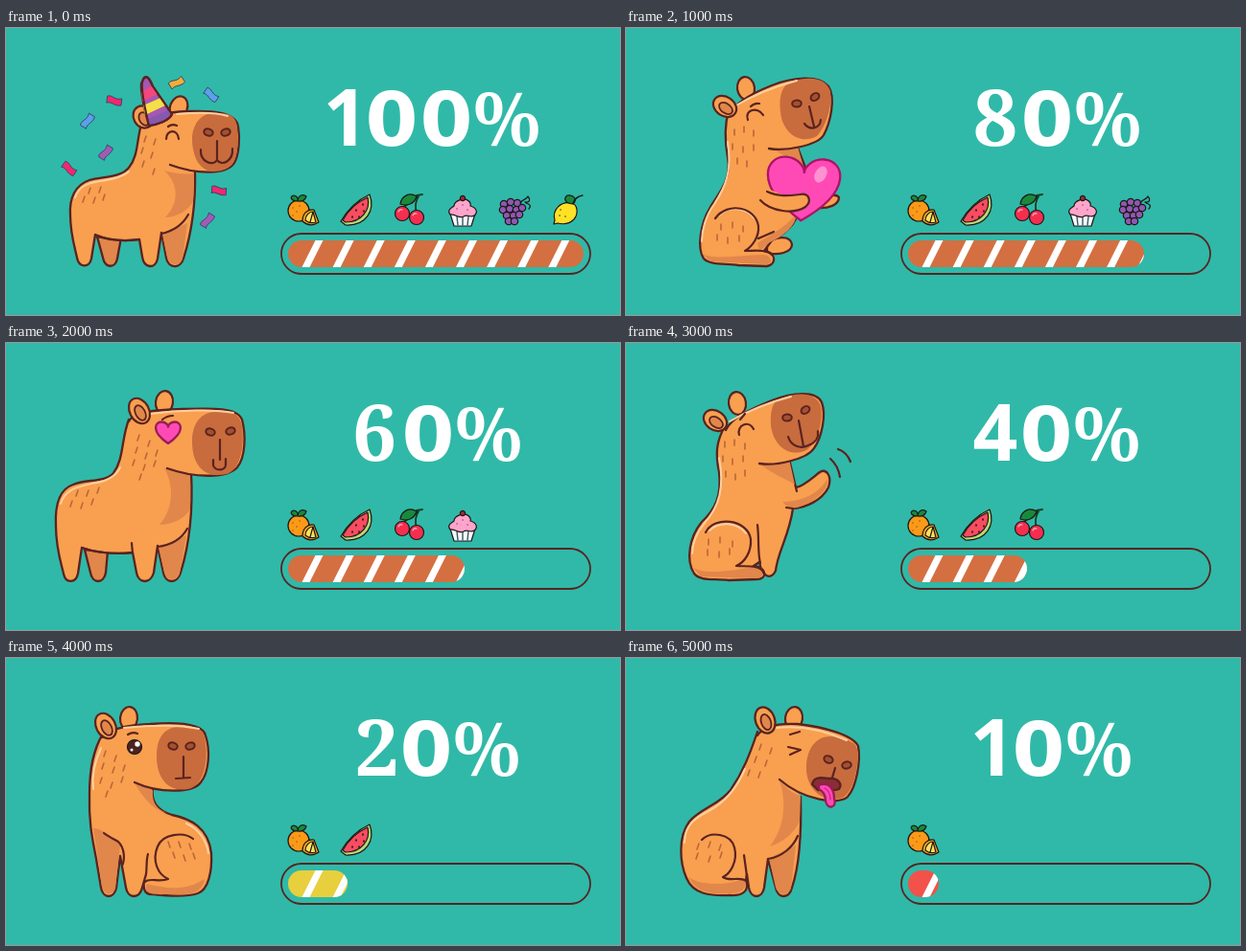
These frames come from a looping animation (640 px wide and 300 px high, 6 s). An HTML page:

```html
<!DOCTYPE html>
<html lang="en">
<head>
<meta charset="utf-8">
<title>Capybara countdown</title>
<style>
  html, body { margin: 0; width: 100%; height: 100%; overflow: hidden; background: #30b9a8; }
  svg { display: block; width: 100%; height: 100%; }
  path, ellipse { stroke-linecap: round; stroke-linejoin: round; }
</style>
</head>
<body>
<svg id="stage" viewBox="0 0 640 300"></svg>
<script>
const INK = '#5a2320', FUR = '#f99f50', SHADE = '#e1874b', SNOUT = '#c86c3e',
      LIGHT = '#ffd0a0', PINK = '#ff4ab6';

const path = (d, fill = 'none', stroke = INK, width = 2.3) =>
  `<path d="${d}" fill="${fill}" stroke="${stroke}" stroke-width="${width}" vector-effect="non-scaling-stroke"/>`;
const fur = d => path(d, FUR);
const dark = d => path(d, SHADE);
const shade = d => path(d, SHADE, 'none');
const light = d => path(d, 'none', LIGHT, 2);
const line = (d, width = 2.2) => path(d, 'none', INK, width);
const oval = (x, y, rx, ry, turn = 0, fill = FUR, stroke = INK, width = 2.2) =>
  `<ellipse transform="translate(${x} ${y}) rotate(${turn})" rx="${rx}" ry="${ry}" fill="${fill}" stroke="${stroke}" stroke-width="${width}"/>`;
const ball = (x, y, r, fill) => oval(x, y, r, r, 0, fill, '#1d1716', 1.2);
const farEar = (x, y, turn) => oval(x, y, 9, 12, turn);
const nearEar = (x, y, turn, ry = 12) =>
  oval(x, y, 10, ry, turn) + oval(x + 1, y + 2, 5, ry * .6, turn, SHADE, INK, 1.8);
const nostrils = (x1, y1, x2, y2, turn = 0) =>
  oval(x1, y1, 4.8, 3.6, turn + 18, '#a5502f', INK, 2) +
  oval(x2, y2, 4.8, 3.6, turn - 18, '#a5502f', INK, 2);
const snout = d => path(d, SNOUT, 'none');
const hairs = (points, dx = -2) =>
  path(points.trim().split(' ').map(p => `M${p}l${dx} 6`).join(''), 'none', '#ba6638', 1.6);
const heart = (x, y, scale, turn, stroke) =>
  `<g transform="translate(${x} ${y}) rotate(${turn}) scale(${scale})">` +
  path('M0 9.5C-16-1-12-10-6-10C-2-10 0-7 0-5.5C0-7 2-10 6-10C12-10 16-1 0 9.5Z', PINK, stroke) + '</g>';
const ribbon = (x, y, turn, color) =>
  `<g transform="translate(${x} ${y}) rotate(${turn})">` +
  path('M-8-3C-4-6 0 0 7-4L8 3C2 6-3 1-7 4Z', color, '#3c4668', 1) + '</g>';

function party() {
  const confetti = [
    [85, 97, -50, '#5aa0ea'], [113, 76, 15, '#f5266f'], [178, 57, -25, '#f2ae35'], [214, 70, 42, '#5aa0ea'],
    [104, 130, -50, '#a35ab7'], [66, 147, 42, '#f5266f'], [222, 170, 12, '#f5266f'], [210, 201, -50, '#a35ab7']
  ].map(c => ribbon(...c)).join('');
  return confetti + dark('M95 218L101 240C103 251 114 252 116 241L120 219Z') +
    farEar(180, 83, 20) +
    fur('M141 101C136 118 138 134 128 146C119 157 100 155 87 159C72 164 66 178 67 195C67 216 72 230 74 240C76 251 87 251 89 241L93 216C110 223 125 223 139 221L142 239C144 252 156 252 158 241L162 214L167 240C169 252 182 252 185 241C191 222 198 190 197 150') +
    shade('M165 149C179 153 190 153 196 152L195 181C191 190 178 198 166 198C179 185 182 165 165 149Z') +
    shade('M163 216L189 204L184 241C182 249 170 249 168 240Z') +
    light('M72 177C76 165 86 162 98 160C111 158 121 156 128 150') +
    line('M93 217C110 223 125 223 139 221M162 215C175 212 184 206 190 195') +
    fur('M140 104C147 92 165 88 190 87C216 86 240 88 242 103C244 115 243 132 238 141C230 154 198 153 171 143') +
    snout('M217 89C235 88 241 93 241 107C243 137 238 150 215 150C199 148 194 130 194 115C195 99 204 89 217 89Z') +
    light('M178 90C200 88 219 88 231 92') + nearEar(143, 93, -28) +
    path('M144 52C148 49 151 57 153 61L173 90C170 97 158 101 149 102C145 87 140 70 141 58Z', '#a557b3') +
    path('M141 67L153 60L158 69L142 77Z', '#f5477d', 'none') +
    path('M143 81L161 73L166 81L145 91Z', '#f5df45', 'none') +
    path('M146 96L169 86L172 90C168 96 157 100 149 101Z', '#8758b0', 'none') +
    line('M144 52C140 55 142 73 149 102C158 101 170 97 173 90L153 61C151 55 148 49 144 52Z') +
    line('M167 116C167 106 179 105 180 116M169 103Q173 100 178 102') +
    nostrils(211, 109, 229, 109) +
    line('M220 118V138M203 127C202 140 216 145 220 138C225 145 237 139 236 126') +
    hairs('146,113 156,116 143,125 153,130 144,139 155,147 88,167 99,166 82,176 93,177 103,174');
}

function cuddle() {
  return farEar(125, 63, -8) +
    fur('M147 225C155 218 171 216 173 226C173 235 158 238 147 235Z') +
    fur('M107 86C102 104 103 119 106 135C110 158 98 171 88 187C77 205 74 231 81 241C87 248 105 246 117 248L147 249C157 247 157 235 144 233L152 222C170 213 181 200 181 183L187 146L177 120') +
    shade('M148 124L178 120L184 142L174 139C166 133 157 129 148 124Z') +
    shade('M79 235C89 243 112 238 143 237C153 238 154 247 146 247L88 244Z') +
    shade('M137 225C153 215 167 207 178 194C177 207 165 217 150 224L139 233Z') +
    light('M106 119C111 151 103 167 92 184C83 196 79 212 79 223M97 196C106 186 125 187 134 199') +
    line('M93 199C106 181 135 187 138 207C139 218 132 228 124 233C133 233 146 231 152 237M138 220L154 213') +
    fur('M108 92C111 79 132 68 152 60C172 52 201 48 211 61C219 73 213 99 206 112C199 123 166 129 149 126') +
    snout('M172 56C196 49 209 54 213 66C215 83 208 104 199 113C181 123 163 109 161 88C159 70 163 60 172 56Z') +
    light('M113 82C134 69 156 61 178 55') + nearEar(103, 82, -55, 13) +
    fur('M202 174C211 179 217 171 222 177C222 185 211 189 199 188Z') +
    heart(184.5, 169.5, 3.35, 4, '#ad1269') +
    oval(203, 153, 6, 9, 28, '#ff91d1', 'none') +
    path('M139 159C151 174 168 176 181 174C191 172 194 181 187 187C175 195 151 192 140 183', FUR, 'none') +
    line('M147 171C160 177 172 175 181 174C191 172 194 181 187 187C175 195 151 192 140 180') +
    line('M127 96C123 86 137 81 143 91M130 82Q134 78 139 79') +
    nostrils(178, 79, 197, 72, -20) +
    line('M191 82L196 103M186 100C191 107 202 106 203 96') +
    hairs('113,106 123,103 133,107 111,121 122,124 133,122 116,136 126,139 99,205 111,203 122,207 95,216 106,219 118,217', 0);
}

function smitten() {
  return dark('M82 216L88 240C90 252 102 252 104 240L106 218Z') + farEar(165, 62, 8) +
    fur('M128 80C120 101 123 121 112 136C103 146 83 142 70 148C55 153 51 171 52 191C52 214 57 229 60 241C62 252 73 251 75 241L79 214C97 220 114 221 132 219L136 240C138 252 151 252 154 240L158 212L164 240C166 252 179 252 182 240C191 211 195 174 193 135') +
    shade('M165 131L192 138L192 173C187 184 172 190 160 190C174 174 176 150 165 131Z') +
    shade('M159 214L188 201L181 241C179 249 167 249 165 240Z') +
    light('M57 168C62 151 77 150 94 146C107 144 115 138 119 130') +
    line('M79 214C97 220 114 221 132 219M158 213C174 211 184 203 189 194M131 209L132 220') +
    fur('M128 82C133 72 154 70 184 69C215 68 241 67 246 80C250 95 250 119 241 130C231 141 199 142 168 131') +
    snout('M219 72C237 71 244 75 246 87C249 108 244 133 230 137C203 143 194 123 194 103C194 83 204 72 219 72Z') +
    light('M151 74C180 70 218 69 237 73') + nearEar(139, 71, -28, 14) +
    heart(169, 94, 1.15, 0, '#961e54') + line('M163 80Q168 76 174 76') +
    nostrils(213, 93, 234, 92) +
    line('M223 101V122M216 122V128C218 134 229 134 229 127V121') +
    hairs('139,96 150,102 137,109 147,115 158,112 134,122 145,127 156,123 141,137 75,154 86,154 97,151 69,165 80,167 91,163');
}

function wave() {
  return farEar(116, 63, -8) +
    fur('M103 87C94 103 93 116 97 135C100 159 93 174 79 187C66 203 62 227 71 241C77 249 91 246 107 248L136 247C148 247 147 235 133 233L139 229C142 245 151 248 156 238C158 218 170 202 174 173C187 172 204 165 211 151C215 139 209 131 202 135C194 141 185 150 177 151L170 121') +
    shade('M139 126L170 121L176 148C166 142 153 137 139 126Z') +
    shade('M163 166C184 166 201 157 210 142C212 157 187 173 170 173Z') +
    shade('M69 234C80 243 111 238 133 234C145 236 145 246 135 246L78 244Z') +
    light('M97 120C103 151 97 171 82 188C73 199 69 210 69 220M87 196C97 186 116 187 125 199') +
    line('M83 198C92 180 127 184 130 205C131 218 124 229 115 233C124 234 139 231 144 240M137 190C139 207 137 219 140 230M177 151L178 155M174 173L167 172') +
    fur('M104 91C110 78 132 68 152 60C173 52 198 49 204 62C209 75 204 99 196 110C189 121 157 129 139 126') +
    snout('M161 58C185 49 199 54 203 66C206 81 200 104 188 112C168 121 153 105 151 86C150 70 153 61 161 58Z') +
    light('M108 82C130 69 149 62 172 56') + nearEar(93, 81, -55, 13) +
    line('M118 96C115 86 128 80 133 90M119 80L124 74') +
    nostrils(168, 78, 187, 70, -20) +
    line('M180 81L185 108M169 98C172 108 182 111 190 107C198 104 201 98 200 92') +
    line('M221 111Q230 114 234 124M213 121Q221 128 223 140') +
    hairs('103,103 113,101 124,105 101,118 111,121 122,118 104,134 114,137 124,133 86,205 98,203 111,207 85,216 97,218 108,215', 0);
}

function waiting() {
  return farEar(128, 63, 6) +
    fur('M101 79C91 96 87 115 87 143C86 178 92 196 95 216L99 240C101 252 113 252 115 240L119 207L125 240C127 252 139 252 142 240L146 226C142 238 142 248 154 247C171 249 188 250 200 246C211 242 215 223 214 204C211 177 192 168 173 164C157 159 151 149 153 136') +
    shade('M134 131L153 138C152 150 156 158 168 162C153 159 144 147 134 131Z') +
    shade('M91 178C98 178 108 184 119 195L114 241C111 249 102 248 100 239Z') +
    shade('M147 236C166 241 187 244 207 231C204 247 192 248 167 247C148 248 143 244 147 236Z') +
    light('M91 137C89 122 94 105 99 94M188 173C200 178 209 190 211 204') +
    line('M102 183C107 187 114 190 117 192C124 199 124 211 121 217M146 226C147 219 146 211 148 205M195 189C185 181 163 184 158 197C152 212 158 226 169 231C160 235 149 229 145 234') +
    fur('M100 83C108 73 130 70 150 69C176 67 205 68 208 81C213 96 212 119 203 130C195 141 160 142 134 130') +
    snout('M181 72C201 71 207 75 208 89C211 111 205 134 190 137C166 141 157 122 157 103C157 82 166 72 181 72Z') +
    light('M123 73C152 70 183 70 201 74') + nearEar(104, 71, -28, 14) +
    ball(134, 93, 7.5, '#4c241f') + oval(137, 90, 2.7, 2.7, 0, '#fff', 'none') + oval(131, 96, 1.5, 1.5, 0, '#fff', 'none') +
    line('M127 80Q132 77 137 79') + nostrils(174, 92, 192, 92) +
    line('M185 103V125M177 126L192 125') +
    hairs('104,97 115,102 102,110 113,114 124,112 100,125 111,130 122,124 106,139') +
    hairs('169,192 180,192 191,194 174,203 185,206 195,204', 2);
}

function yuck() {
  return farEar(175, 63, 8) +
    fur('M137 77C129 101 122 119 109 138C98 153 78 157 66 171C54 187 56 214 63 230C70 247 88 249 108 248C122 249 129 243 125 232L126 226L128 240C130 252 142 252 144 240L148 210L156 240C158 252 170 252 173 240C181 216 183 181 182 145') +
    shade('M160 128C169 138 175 142 182 144L181 171C174 184 163 193 150 197C165 177 168 152 160 128Z') +
    shade('M149 209L177 196L172 240C170 249 159 249 156 240Z') +
    shade('M65 229C80 239 106 237 123 231C128 242 118 247 105 246C83 248 71 241 65 229Z') +
    light('M61 193C61 175 72 167 86 160C103 151 116 135 124 116') +
    line('M79 190C88 181 109 183 113 198C117 213 108 226 101 229C108 234 119 228 125 233M123 206L126 228M148 210C162 208 174 198 179 186') +
    fur('M137 81C143 71 159 68 179 69C205 72 236 80 242 92C245 108 240 135 231 145C222 154 185 149 160 127') +
    snout('M214 82C232 85 240 88 241 96C243 113 237 140 226 146C204 153 189 136 188 117C187 97 197 81 214 82Z') +
    light('M157 73C183 70 210 77 230 86') + nearEar(145, 65, -20, 14) +
    line('M169 93L182 96L171 101M171 80L181 77') +
    nostrils(211, 106, 230, 112, 8) + line('M218 115L215 125') +
    path('M194 132C196 122 207 126 212 126C221 125 226 132 222 137C215 140 208 137 200 138Z', '#8b2d35') +
    path('M201 133C211 129 217 136 217 147C221 157 209 159 208 149C208 143 205 139 201 137Z', PINK, '#961e54') +
    path('M207 136Q213 139 213 148', 'none', '#c82483', 1.3) +
    hairs('141,90 152,94 136,103 147,107 129,117 140,119 76,194 88,192 99,195 75,204 88,207 100,203');
}

const BLACK = '#1d1716', LEAF = '#188a3c';
const trim = (d, fill) => path(d, fill, BLACK, 1.2);
const treats = [
  ball(305, 191, 11, '#fb9a18') +
    trim('M304 181C297 181 295 176 300 175Q305 176 304 181C305 173 311 174 313 176Q311 182 304 181Z', LEAF) +
    path('M299 188h.1M303 192h.1M299 196h.1M306 186h.1', 'none', '#a75310', 1.5) +
    trim('M309 202C309 194 314 189 321 190L326 203Q317 209 309 202Z', '#fba41c') +
    trim('M312 201C312 196 316 192 320 192L323 203Q317 205 312 201ZM320 192L317 203', '#ffe15b'),
  trim('M349 202C356 190 366 180 379 174C385 190 376 207 354 206Z', '#b7d976') +
    trim('M351 201C357 190 366 182 377 177C380 190 371 203 354 203Z', '#fa4c61') +
    path('M361 197v1M365 190v1M372 184v1M368 197v1M373 191v1', 'none', BLACK, 1.6),
  path('M414 188C418 184 424 180 430 176Q425 184 428 193M428 175L434 174', 'none', '#183e25', 1.8) +
    trim('M428 176C420 171 412 176 411 184C419 187 426 183 428 176Z', LEAF) +
    ball(413, 194, 7.5, '#f52e50') + ball(428, 198, 7.5, '#f52e50') +
    path('M409 192q1-3 4-2M424 196q1-3 4-2', 'none', '#ffabbb', 1.3),
  trim('M463 194L467 207H485L489 194Z', '#f5fbff') + path('M470 197L471 206M476 197V206M482 197L481 206', 'none', '#3d5560', 1.4) +
    trim('M463 195C459 190 465 188 467 186C467 181 472 180 475 179C482 178 485 183 484 186C491 188 492 193 488 196C484 199 481 194 477 197C472 200 469 194 463 195Z', '#ffa4cb') +
    ball(476, 178, 2.6, '#a02a38') + path('M470 189h.1M476 185h.1M481 190h.1', 'none', '#95407f', 1.5),
  [[519, 184], [526, 182], [533, 183], [518, 190], [525, 189], [532, 190], [538, 188], [522, 196], [529, 196], [535, 195], [524, 202], [530, 202]]
    .map(([x, y]) => ball(x, y, 3.7, '#8f58b2')).join('') +
    path('M536 183C539 178 542 180 544 176C547 179 546 183 541 182M542 183Q549 185 545 189', 'none', BLACK, 1.3),
  trim('M572 201C569 190 578 181 589 183C596 184 597 194 592 200C586 206 579 205 575 204L571 205Z', '#ffe126') +
    trim('M591 184C582 183 581 178 585 175C592 174 596 179 591 184Z', LEAF) +
    path('M591 183Q594 176 601 175M578 190h.1M577 196h.1M583 197h.1', 'none', BLACK, 1.3)
];

const scenes = [
  { pose: party, label: '100%', centers: [354, 402, 459, 522], end: 602, treats: 6, color: '#d46f42' },
  { pose: cuddle, label: '80%', centers: [385, 439, 502], end: 540, treats: 5, color: '#d46f42' },
  { pose: smitten, label: '60%', centers: [384, 440, 503], end: 478, treats: 4, color: '#d46f42' },
  { pose: wave, label: '40%', centers: [385, 438, 501], end: 418, treats: 3, color: '#d46f42' },
  { pose: waiting, label: '20%', centers: [387, 438, 501], end: 356, treats: 2, color: '#e7cf3e' },
  { pose: yuck, label: '10%', centers: [382, 430, 493], end: 326, treats: 1, color: '#f2524a' }
];

function glyphStyle(char) {
  if (char === '0') return "font:bold 79px 'DejaVu Sans',sans-serif";
  if (char === '%') return "font:600 78px 'Noto Serif',serif";
  return '14'.includes(char) ? "font:bold 82px 'Noto Sans',sans-serif" : "font:bold 82px 'Noto Serif',serif";
}

function label({ label, centers }) {
  const glyphs = [...label].map((c, i) => `<tspan x="${centers[i]}" style="${glyphStyle(c)}">${c}</tspan>`);
  return `<text y="123" text-anchor="middle" fill="#fff">${glyphs.join('')}</text>`;
}

function bar({ end, color }) {
  let stripes = '';
  for (let i = 0; i < 9; i++) stripes += `M${308.5 + i * 32.1} 250l14-28h8l-14 28z`;
  const shape = `<rect x="294" y="222" width="${end - 294}" height="28" rx="14" fill="${color}"/>`;
  return `<clipPath id="fill">${shape}</clipPath>${shape}` +
    `<path d="${stripes}" fill="#fff" clip-path="url(#fill)"/>` +
    `<rect x="287" y="215" width="322" height="42" rx="21" fill="none" stroke="#562524" stroke-width="1.8"/>`;
}

const stage = document.getElementById('stage');
const start = performance.now();
let shown = -1;

function draw() {
  const index = Math.floor((performance.now() - start) / 1000) % scenes.length;
  if (index !== shown) {
    const scene = scenes[shown = index];
    stage.innerHTML = scene.pose() + label(scene) + treats.slice(0, scene.treats).join('') + bar(scene);
  }
  requestAnimationFrame(draw);
}
draw();
</script>
</body>
</html>
```
